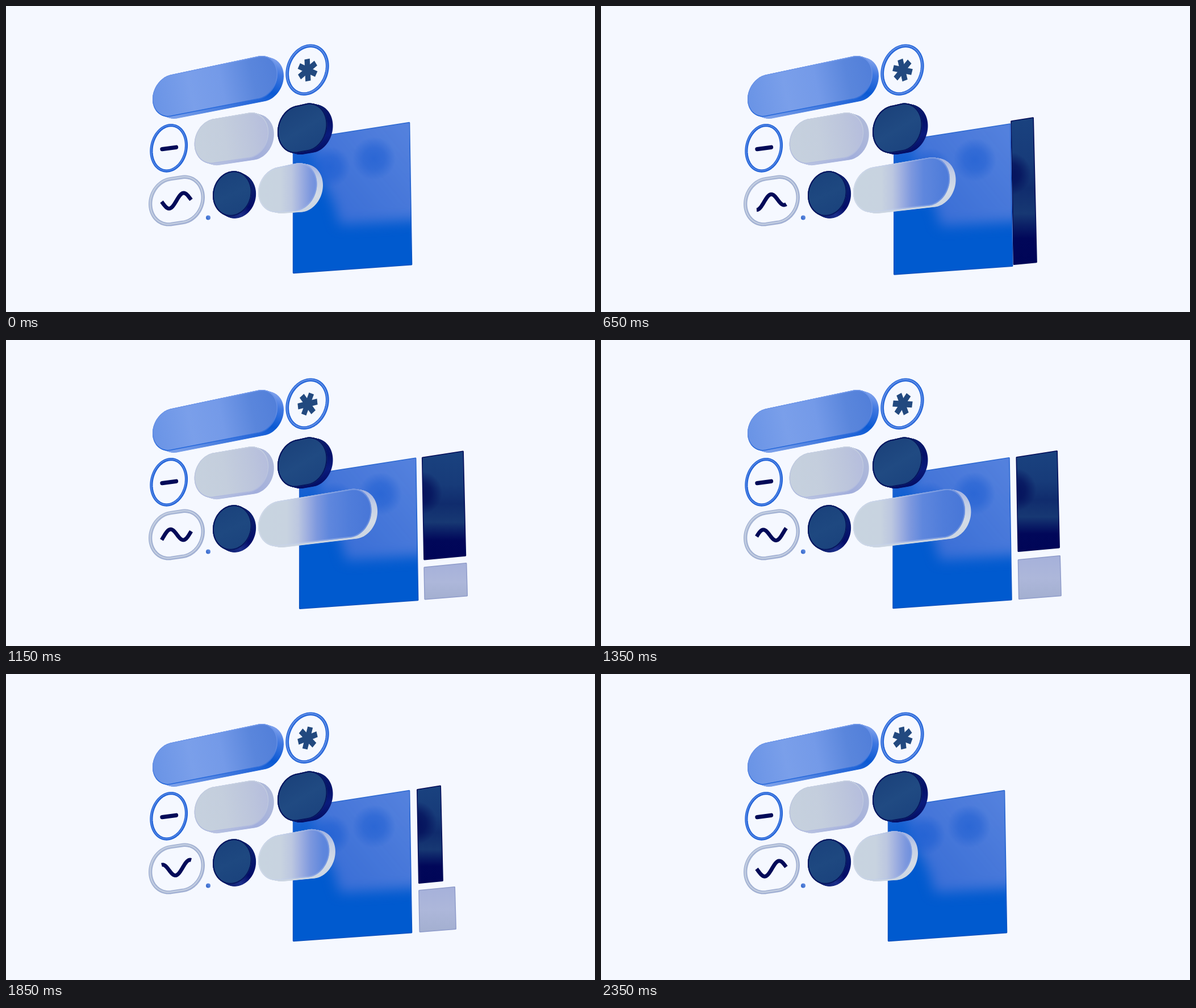
These frames come from a looping animation (1037 by 540 pixels, 2.4 s). An HTML page with a canvas:

```html
<!DOCTYPE html>
<html lang="en">
<head>
<meta charset="utf-8">
<title>Floating shapes</title>
<style>
html, body { margin: 0; width: 100%; height: 100%; overflow: hidden; background: #f5f8ff; }
canvas { display: block; width: 100%; height: 100%; }
</style>
</head>
<body>
<canvas id="stage" width="1037" height="540"></canvas>
<script>
const ctx = document.getElementById('stage').getContext('2d');
const LOOP = 2400, STEP = 50, TAU = Math.PI * 2;
const NAVY = '#020a58';

// Motion tables: [ms, value]
const SHIFT = [[0, 0], [250, 4.5], [650, 10.2], [950, 12.5], [1350, 8.5], [1850, 0], [2400, 0]];
const GAP = [[0, 0], [650, 0], [900, 7], [1350, 11], [1850, 12], [2200, 7], [2400, 1]];
const DARK_RIGHT = [[0, 690], [500, 690], [550, 716], [600, 742], [650, 762], [900, 799], [1100, 806], [1350, 804], [1650, 788], [1850, 766], [2200, 718], [2400, 690]];
const DARK_BOTTOM = [[0, 457], [750, 457], [900, 452], [1050, 413], [1200, 381], [1350, 374], [1850, 370], [2400, 370]];
const GREY_RIGHT = [[0, 690], [800, 690], [850, 812], [900, 814], [1100, 812], [1350, 809], [1650, 804], [1850, 791], [2200, 728], [2400, 690]];
const GREY_TOP = [[0, 458], [850, 458], [900, 456], [1050, 424], [1200, 393], [1350, 387], [1850, 381], [2400, 381]];

// Smooth curve through the points, flat at turning points
function track(t, pts) {
  let i = 0;
  while (i < pts.length - 2 && t >= pts[i + 1][0]) i++;
  const rate = k => (pts[k + 1][1] - pts[k][1]) / (pts[k + 1][0] - pts[k][0]);
  const tangent = k => {
    if (k === 0 || k === pts.length - 1) return 0;
    const a = rate(k - 1), b = rate(k);
    return a * b <= 0 ? 0 : 2 * a * b / (a + b);
  };
  const [t0, v0] = pts[i], [t1, v1] = pts[i + 1];
  const h = t1 - t0, u = (t - t0) / h, w = 1 - u;
  return v0 * (1 + 2 * u) * w * w + tangent(i) * h * u * w * w
    + v1 * u * u * (3 - 2 * u) - tangent(i + 1) * h * u * u * w;
}

const cubic = u => {
  u = Math.min(1, Math.max(0, u));
  return u < 0.5 ? 4 * u ** 3 : 1 - 4 * (1 - u) ** 3;
};

function ramp(x0, y0, x1, y1, ...stops) {
  const g = ctx.createLinearGradient(x0, y0, x1, y1);
  stops.forEach(([at, color]) => g.addColorStop(at, color));
  return g;
}

function glow(x, y, r, rgb, alpha) {
  const g = ctx.createRadialGradient(x, y, 0, x, y, r);
  g.addColorStop(0, `rgba(${rgb},${alpha})`);
  g.addColorStop(0.5, `rgba(${rgb},${alpha * 0.75})`);
  g.addColorStop(1, `rgba(${rgb},0)`);
  ctx.fillStyle = g;
  ctx.fillRect(x - r, y - r, 2 * r, 2 * r);
}

// Capsule seen at an angle: two skewed half ellipses
function capsule({ x1, y1, x2 = x1, y2 = y1, rx, ry, ry2 = ry, skew }, dx = 0, dy = 0) {
  ctx.beginPath();
  for (let i = 0; i <= 96; i++) {
    const left = i <= 48;
    const a = Math.PI / 2 + (left ? i / 48 : 1 + (i - 49) / 47) * Math.PI;
    const c = Math.cos(a) * rx;
    ctx.lineTo((left ? x1 : x2) + c + dx, (left ? y1 : y2) - c * skew + Math.sin(a) * (left ? ry : ry2) + dy);
  }
  ctx.closePath();
}

function solid(shape, [dx, dy], side, face, edge, width = 1.5) {
  for (let k = 12; k >= 0; k--) {
    capsule(shape, dx * k / 12, dy * k / 12);
    ctx.fillStyle = side;
    ctx.fill();
  }
  capsule(shape);
  ctx.fillStyle = face;
  ctx.fill();
  ctx.save();
  ctx.clip();
  ctx.strokeStyle = edge;
  ctx.lineWidth = width * 2;
  ctx.stroke();
  ctx.restore();
}

function ring(shape, width, dark, light) {
  capsule(shape);
  ctx.strokeStyle = dark;
  ctx.lineWidth = width;
  ctx.stroke();
  capsule(shape, -0.4, -0.4);
  ctx.strokeStyle = light;
  ctx.lineWidth = width * 0.35;
  ctx.stroke();
}

function quad(points) {
  ctx.beginPath();
  points.forEach(([x, y]) => ctx.lineTo(x, y));
  ctx.closePath();
}

function plate(points, fill, edge) {
  quad(points);
  ctx.lineJoin = 'round';
  ctx.lineWidth = 3;
  ctx.strokeStyle = edge;
  ctx.stroke();
  ctx.fillStyle = fill;
  ctx.fill();
}

function bluePanel(p) {
  ctx.save();
  ctx.translate(p, p * 0.25);
  const body = [[506.3, 238], [709.8, 206.3], [713.8, 456], [506.3, 470.7]];
  plate(body, '#005acf', ramp(0, 210, 0, 470, [0, '#2f69d0'], [0.6, '#1d5fcd'], [1, '#0750bd']));
  quad(body);
  ctx.clip();
  ctx.fillStyle = ramp(0, 200, 0, 300, [0, 'rgba(70,118,217,.75)'], [0.6, 'rgba(56,108,214,.45)'], [1, 'rgba(40,100,212,.1)']);
  ctx.fillRect(500, 200, 220, 100);
  ctx.filter = 'blur(11px)';
  ctx.fillStyle = ramp(570, 340, 715, 220, [0, 'rgba(66,114,215,.9)'], [1, 'rgba(86,130,221,.97)']);
  quad([[535, 190], [745, 160], [745, 376], [588, 386], [576, 345], [552, 300]]);
  ctx.fill();
  ctx.filter = 'none';
  glow(570, 284, 36, '24,92,210', 0.65);
  glow(648, 269, 38, '36,98,211', 0.8);
  ctx.restore();
}

function sidePanels(t, p) {
  const left = 711 + p + track(t, GAP);
  const top = 203 + (left - 723) * 0.4;
  const lx = y => left + (y - top) * 0.0175;

  const dr = track(t, DARK_RIGHT), db = track(t, DARK_BOTTOM);
  if (dr > left + 3) {
    const w = dr - left, trY = top - w * 0.15, brY = db - w * 0.09;
    const rx = dr + (brY - trY) * 0.023;
    const pts = [[left + 1.5, top + 1.5], [dr - 1.5, trY + 1.5], [rx - 1.5, brY - 1.5], [lx(db) + 1.5, db - 1.5]];
    plate(pts, ramp(0, 197, 0, db, [0, '#1a427f'], [0.3, '#173b79'], [0.48, '#102c6d'], [0.65, '#173873'], [0.74, '#0a1d65'], [0.82, '#010759'], [1, '#000557']), '#020b57');
    ctx.save();
    quad(pts);
    ctx.clip();
    glow(left - 2, 197 + (db - 197) * 0.38, 38, '0,8,85', 0.8);
    ctx.restore();
  }

  const gr = track(t, GREY_RIGHT), gt = track(t, GREY_TOP);
  if (t >= 875 && gr > left + 3) {
    const w = gr - lx(gt), gb = 456 + (left - 723) * 0.27;
    const trY = gt - w * 0.093, brY = gb - w * 0.076;
    if (gb - gt < 4) {
      ctx.beginPath();
      ctx.moveTo(lx(gb) + 3, gb - 0.5);
      ctx.lineTo(gr + 1.5, brY + 0.8);
      ctx.strokeStyle = '#96a5d4';
      ctx.lineWidth = 2;
      ctx.stroke();
    } else {
      const x = lx(gt);
      plate([[x + 1.5, gt + 1.5], [gr - 1.5, trY + 1.5], [gr + (brY - trY) * 0.026 - 1.5, brY - 1.5], [lx(gb) + 1.5, gb - 1.5]],
        ramp(0, gt - 5, 0, gb, [0, '#a6b1da'], [0.5, '#adb7da'], [1, '#a3afd0']), '#8f9cca');
    }
  }
}

function star(t) {
  ctx.save();
  ctx.transform(0.88, -0.1, 0, 1, 531, 113);
  ctx.rotate(t / LOOP * Math.PI - 0.05);
  ctx.fillStyle = '#22497f';
  for (let i = 0; i < 3; i++) {
    ctx.fillRect(-5.3, -19.5, 10.6, 39);
    ctx.rotate(Math.PI / 3);
  }
  ctx.restore();
}

function wave(t) {
  ctx.beginPath();
  for (let x = 274; x <= 326; x++) {
    ctx.lineTo(x, 343.7 - (x - 300) * 0.18 + 11.5 * Math.sin(TAU * ((x - 276) / 48 + t / LOOP)));
  }
  ctx.lineWidth = 6.8;
  ctx.lineCap = 'butt';
  ctx.strokeStyle = NAVY;
  ctx.stroke();
}

function draw(t) {
  ctx.fillStyle = '#f5f8ff';
  ctx.fillRect(0, 0, 1037, 540);

  const p = track(t, SHIFT);
  sidePanels(t, p);
  bluePanel(p);

  // Long blue pill
  solid({ x1: 291, y1: 158, x2: 445, y2: 126.5, rx: 33, ry: 36.8, ry2: 38, skew: 0.2 }, [11, 3.5],
    ramp(478, 92, 432, 238, [0, '#86a6ee'], [0.18, '#3f77e0'], [0.4, '#0a59d3'], [0.6, '#2c6bda'], [1, '#7a9fe9']),
    ramp(260, 165, 478, 120, [0, '#6a94e6'], [0.3, '#7a9fea'], [0.55, '#749ae8'], [0.8, '#5a86dc'], [1, '#527fd9']),
    ramp(360, 105, 372, 178, [0, '#7299ea'], [0.6, '#5f8be2'], [1, '#2467da']));

  // Star ring
  ring({ x1: 530.5, y1: 112.7, rx: 35.3, ry: 41.8, skew: 0.2 }, 5.8,
    ramp(500, 70, 560, 155, [0, '#2a69da'], [0.5, '#2466d8'], [1, '#2e6bda']), '#5f8de6');
  star(t);

  // Dash ring
  ring({ x1: 286.7, y1: 250.8, rx: 30.8, ry: 39.9, skew: 0.17 }, 5.2, '#2364d8', '#5285e4');
  ctx.beginPath();
  ctx.moveTo(275, 252.6);
  ctx.lineTo(299.5, 249.3);
  ctx.lineWidth = 7.4;
  ctx.lineCap = 'round';
  ctx.strokeStyle = NAVY;
  ctx.stroke();

  // Grey pill
  solid({ x1: 366, y1: 238.5, x2: 428, y2: 228.5, rx: 34.3, ry: 39.3, ry2: 40, skew: 0.15 }, [9.5, 3],
    ramp(360, 280, 470, 220, [0, '#bac4e2'], [0.6, '#a2aedc'], [1, '#aeb9da']),
    ramp(332, 245, 464, 225, [0, '#c6d1de'], [0.4, '#c4cedd'], [0.75, '#bcc5dc'], [1, '#b5bddd']),
    ramp(395, 190, 402, 275, [0, '#c6d0e0'], [0.6, '#bac4de'], [1, '#adb8df']));

  // Dark pill
  solid({ x1: 513, y1: 217.5, x2: 530.5, y2: 214, rx: 35, ry: 41.8, ry2: 42.2, skew: 0.14 }, [10, 2.5],
    ramp(540, 172, 560, 262, [0, '#0a1f6c'], [0.4, '#05126a'], [0.65, '#0a1b7c'], [1, '#020a5c']),
    ramp(500, 180, 545, 255, [0, '#1b427b'], [0.5, '#204a82'], [1, '#1b437e']), '#06155f', 2);

  // Wave frame
  ring({ x1: 290, y1: 345.2, x2: 311, y2: 342, rx: 35.8, ry: 40, skew: 0.12 }, 6.4,
    ramp(260, 305, 340, 385, [0, '#aab8d6'], [0.5, '#a1b0d2'], [1, '#a2b0d4']), '#c4cfe2');
  wave(t);

  // Dot
  ctx.beginPath();
  ctx.arc(356, 373.5, 4, 0, TAU);
  ctx.fillStyle = ramp(352, 376, 359, 371, [0, '#2c5fc4'], [0.5, '#4a7ad6'], [1, '#5d89de']);
  ctx.fill();

  // Dark disc
  solid({ x1: 398.3, y1: 331, rx: 34.3, ry: 39.6, skew: 0.1 }, [7.5, 4],
    ramp(385, 372, 440, 320, [0, '#0a1a6a'], [0.3, '#1c2f8a'], [0.55, '#030c68'], [1, '#0a1c6e']),
    ramp(380, 295, 415, 370, [0, '#1a427c'], [0.5, '#1e4880'], [1, '#1a427c']), '#06155f', 2);

  // Frosted pill, its right end slides
  const d = 96 * (cubic(t / 1130) - cubic((t - 1130) / 1170));
  const x2 = 511.5 + d, y2 = 319.5 - d * 0.144;
  solid({ x1: 480, y1: 324, x2, y2, rx: 36, ry: 39.7, ry2: 42 + d * 0.008, skew: 0.144 }, [10.5, 2],
    ramp(0, y2 - 42, 0, y2 + 44, [0, '#9fb0e2'], [0.3, '#c3cee5'], [0.65, '#d4dce6'], [1, '#cbd5e2']),
    ramp(444 + p, 0, 640 + p, 0, [0, '#c8d4e0'], [0.2, '#c8d3e0'], [0.3, '#bcc7e0'], [0.38, '#a0b0e0'], [0.47, '#7d98de'], [0.58, '#5f87dd'], [0.76, '#507dda'], [1, '#4675d7']),
    ramp(444, 0, 560 + d, 0, [0, 'rgba(210,219,234,.8)'], [0.4, 'rgba(190,204,234,.5)'], [1, 'rgba(130,160,228,.5)']), 2);
}

let last = -1;
function tick(now) {
  const t = Math.floor(now % LOOP / STEP) * STEP;
  if (t !== last) draw(last = t);
  requestAnimationFrame(tick);
}
draw(0);
requestAnimationFrame(tick);
</script>
</body>
</html>
```
